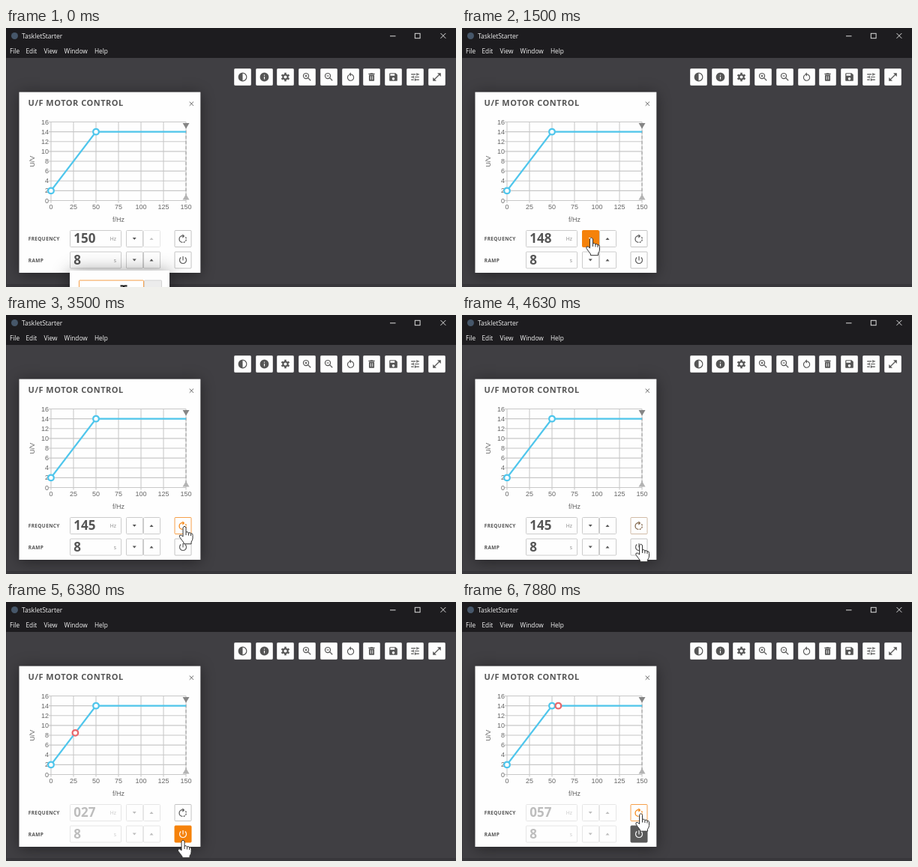
Write an HTML page with a canvas that moves like this. It is 600 px wide and 346 px high and loops after 8000 ms.

```html
<!DOCTYPE html>
<html lang="en">
<head>
<meta charset="utf-8">
<title>Motor control</title>
<style>
html, body { margin: 0; width: 100%; height: 100%; overflow: hidden; background: #403f43; }
canvas { display: block; width: 600px; height: 346px; }
</style>
</head>
<body>
<canvas id="stage" width="600" height="346"></canvas>
<script>
const ctx = document.getElementById('stage').getContext('2d');
const LOOP = 8000, TICK = 125, START = 5000;
const ORANGE = '#f5820b', AMBER = '#f6a04a', GREY = '#555555', BLUE = '#4fc6ec', RED = '#e8686c';
const SANS = '"Open Sans", "Noto Sans", sans-serif';
const PLOT = '"Liberation Sans", Arial, sans-serif';

// Icons on a 24 unit grid: s = stroked, f = filled (even-odd)
const disc = 'M12 2A10 10 0 0 1 12 22A10 10 0 0 1 12 2Z';
const lens = 'M15.5 9.5A6 6 0 1 1 3.5 9.5A6 6 0 1 1 15.5 9.5M14 14L20 20M7 9.5h5';
const ICONS = {
  contrast: { f: disc + 'M12 4A8 8 0 0 1 12 20Z' },
  info: { f: disc + 'M11 11h2v6h-2zM11 7h2v2h-2z' },
  gear: { f: gearPath() },
  zoomIn: { s: lens + 'M9.5 7v5' },
  zoomOut: { s: lens },
  replay: { s: 'M12 6A7 7 0 1 1 8 7.3', f: 'M12.5 1.5v9L8 6z' },
  trash: { f: 'M6 7h12v12q0 2-2 2H8q-2 0-2-2zM5 4h3.5l1-1h5l1 1H19v2H5zM9 10h1.5v8H9zM13.5 10H15v8h-1.5z' },
  save: { f: 'M5 3h12l4 4v12q0 2-2 2H5q-2 0-2-2V5q0-2 2-2zM5 5h10v4H5zM12 13a3 3 0 0 1 0 6a3 3 0 0 1 0-6z' },
  tune: { s: 'M3 6h10M15 6h6M16 3v6M3 12h5M11 12h10M8 9v6M3 18h6M12 18h9M12 15v6' },
  expand: { s: 'M6 18L18 6', f: 'M13 3h8v8zM3 13v8h8z' },
  turn: {
    s: 'M11 5A7 7 0 0 0 11 19M13 19A7 7 0 0 0 16.2 17.6M17.6 16.2A7 7 0 0 0 18.9 13M18.9 11A7 7 0 0 0 17.6 7.8',
    f: 'M11 1v9l4.5-4.5z'
  },
  power: { s: 'M12 3v10M7 5.8A8 8 0 1 0 17 5.8' }
};
const TOOLS = ['contrast', 'info', 'gear', 'zoomIn', 'zoomOut', 'replay', 'trash', 'save', 'tune', 'expand'];

const HAND = new Path2D('M-2 2Q0-1.6 2 2V8Q4.4 6.6 5.4 9Q8 7.6 8.5 10Q11 9 11 12.5V16Q11 18.5 9 21V23.7H-1V22Q-4 18-6.6 14.4Q-7.4 11.2-4.3 12L-2 14Z');
const KNUCKLES = new Path2D('M2 8v4M5.4 9v3.5M8.5 10v3');

// Pointer stops: time, x, y
const STOPS = [[0, 157, 351], [375, 157, 351], [1000, 172.5, 280], [2500, 172.5, 280],
  [3125, 238, 282], [4375, 238, 282.5], [4625, 238.5, 306], [4875, 236, 318],
  [6875, 236, 318], [7500, 238.5, 282.5]];

const clamp = (v, a = 0, b = 1) => Math.min(b, Math.max(a, v));
const ease = v => v * v * (3 - 2 * v);
const fade = (t, on, off) => clamp((t - on) / 200) * (1 - clamp((t - off) / 200));
const plotX = f => 60 + f * 1.2;
const plotY = u => 230.5 - u * 6.5625;

// Six teeth, five points each
function gearPath() {
  const teeth = [[-16, 7.2], [-13, 10], [13, 10], [16, 7.2], [30, 7]];
  let d = '';
  for (let i = 0; i < 30; i++) {
    const [turn, r] = teeth[i % 5];
    const a = (Math.floor(i / 5) * 60 + turn) * Math.PI / 180;
    d += (i ? 'L' : 'M') + (12 + r * Math.sin(a)) + ' ' + (12 - r * Math.cos(a));
  }
  return d + 'ZM12 8.5a3.5 3.5 0 0 1 0 7a3.5 3.5 0 0 1 0-7z';
}

function mix(a, b, k) {
  const part = (c, i) => parseInt(c.slice(i, i + 2), 16);
  return 'rgb(' + [1, 3, 5].map(i => Math.round(part(a, i) + (part(b, i) - part(a, i)) * k)) + ')';
}

function rect(x, y, w, h, fill) {
  ctx.fillStyle = fill;
  ctx.fillRect(x, y, w, h);
}

function box(x, y, w, h, fill, border) {
  ctx.beginPath();
  ctx.roundRect(x + .5, y + .5, w - 1, h - 1, 1);
  ctx.fillStyle = fill;
  ctx.fill();
  ctx.strokeStyle = border;
  ctx.lineWidth = 1;
  ctx.stroke();
}

function line(color, width, ...pts) {
  ctx.beginPath();
  pts.forEach(([x, y]) => ctx.lineTo(x, y));
  ctx.strokeStyle = color;
  ctx.lineWidth = width;
  ctx.stroke();
}

function text(str, x, y, size, color, { weight = 400, family = SANS, align = 'left', gap = 0 } = {}) {
  ctx.font = `${weight} ${size}px ${family}`;
  ctx.letterSpacing = gap + 'px';
  ctx.textAlign = align;
  ctx.fillStyle = color;
  ctx.fillText(str, x, y);
}

function triangle(x, y, w, h, color) {
  ctx.beginPath();
  ctx.moveTo(x - w / 2, y);
  ctx.lineTo(x + w / 2, y);
  ctx.lineTo(x, y + h);
  ctx.fillStyle = color;
  ctx.fill();
}

function icon(name, x, y, scale, color) {
  const { s, f } = ICONS[name];
  ctx.save();
  ctx.translate(x, y);
  ctx.scale(scale, scale);
  ctx.translate(-12, -12);
  ctx.fillStyle = ctx.strokeStyle = color;
  ctx.lineWidth = 2;
  if (s) ctx.stroke(new Path2D(s));
  if (f) ctx.fill(new Path2D(f), 'evenodd');
  ctx.restore();
}

function shadowed(x, y, w, h, blur) {
  ctx.save();
  ctx.shadowColor = 'rgba(0,0,0,.45)';
  ctx.shadowBlur = blur;
  ctx.shadowOffsetY = 2;
  rect(x, y, w, h, '#fefefe');
  ctx.restore();
}

function drawWindow() {
  rect(0, 0, 600, 346, '#403f43');
  rect(0, 0, 600, 40, '#1d1c1f');
  rect(0, 342, 600, 4, '#38373b');
  rect(0, 40, 1, 306, '#38373b');
  ctx.beginPath();
  ctx.arc(11.5, 10.5, 4.5, 0, 7);
  ctx.fillStyle = '#46576a';
  ctx.fill();
  text('TaskletStarter', 21, 13.6, 8.5, '#f0f0f0');
  [['File', 5], ['Edit', 26.5], ['View', 50.5], ['Window', 77.5], ['Help', 118]]
    .forEach(([s, x]) => text(s, x, 33.8, 8.3, '#f4f4f4'));
  line('#dcdcdc', 1, [512, 10.8], [519.5, 10.8]);
  ctx.strokeRect(545.3, 7.3, 6.8, 6.4);
  line('#dcdcdc', 1, [579.5, 7], [586.3, 13.8]);
  line('#dcdcdc', 1, [586.3, 7], [579.5, 13.8]);
  TOOLS.forEach((name, i) => {
    const x = Math.round(303.8 + i * 28.75);
    box(x, 54, 23, 23, '#fdfdfd', '#d8d8d8');
    icon(name, x + 11.5, 65.5, .59, GREY);
  });
}

function dot(f, u, color) {
  ctx.beginPath();
  ctx.arc(plotX(f), plotY(u), 3.8, 0, 7);
  ctx.fillStyle = '#fff';
  ctx.fill();
  ctx.strokeStyle = color;
  ctx.lineWidth = 2.3;
  ctx.stroke();
}

function drawChart(freq, running) {
  const label = { family: PLOT, align: 'center' };
  for (let f = 0; f <= 150; f += 25) {
    const x = plotX(f);
    line('#c8c8c8', 1.1, [x, 125.5], [x, 233.5]);
    text(f, x, 242, 9, '#666', label);
  }
  for (let u = 0; u <= 16; u += 2) {
    const y = plotY(u);
    line('#c8c8c8', 1.1, [57, y], [240, y]);
    text(u, 57, y + 3.1, 9, '#666', { ...label, align: 'right' });
  }
  text('f/Hz', 150, 258.5, 9, '#666', label);
  ctx.save();
  ctx.translate(38.2, 178.3);
  ctx.rotate(-Math.PI / 2);
  text('U/V', 0, 0, 9, '#666', label);
  ctx.restore();

  ctx.setLineDash([4, 3]);
  line('#9c9c9c', 1, [240, 130], [240, 228]);
  ctx.setLineDash([]);
  line(BLUE, 2.3, [60, plotY(2)], [120, plotY(14)], [240, plotY(14)]);
  triangle(240, 127, 9, 7.5, '#858585');
  triangle(240, 229.5, 9, -7.5, '#b3b3b3');
  dot(0, 2, BLUE);
  dot(50, 14, BLUE);
  if (running) dot(freq, Math.min(14, 2 + freq * .24), RED);
}

function drawRow(y, name, value, unit, off, atMax, press) {
  const ink = off ? '#bdbdbd' : GREY, edge = off ? '#e6e6e6' : '#cccccc';
  text(name, 29.8, y + 14, 6.5, GREY, { weight: 700, gap: .35 });
  box(85, y, 69, 23, '#fefefe', edge);
  text(value, 90.3, y + 17.4, 17, ink, { weight: 700 });
  text(unit, 147, y + 14, 6.8, off ? '#c8c8c8' : '#888', { align: 'right' });
  box(183, y, 23, 23, '#fefefe', off || atMax ? '#e6e6e6' : '#cccccc');
  box(160, y, 23, 23, mix('#fefefe', ORANGE, press), mix(edge, ORANGE, press));
  triangle(171.2, y + 10, 5, 3, mix(ink, '#ffffff', press));
  triangle(194, y + 13, 5, -3, atMax ? '#c4c4c4' : ink);
}

function drawPanel(t, freq, running) {
  shadowed(17.5, 85.6, 241.8, 241.4, 18);
  text('U/F MOTOR CONTROL', 29.6, 103.9, 11, GREY, { weight: 700, gap: .5 });
  line('#666', 1, [244.7, 98.5], [250, 103.8]);
  line('#666', 1, [250, 98.5], [244.7, 103.8]);
  drawChart(freq, running);
  const digits = String(freq).padStart(3, '0');
  drawRow(270, 'FREQUENCY', digits, 'Hz', running, freq === 150, fade(t, 850, 2475));
  drawRow(298.5, 'RAMP', '8', 's', running, false, 0);

  const turn = Math.max(fade(t, 2850, 4475), fade(t, 7175, 9000));
  box(224.5, 270, 23, 23, '#fefefe', mix('#c4c4c4', AMBER, turn));
  icon('turn', 236, 282, .62, mix(GREY, ORANGE, turn));

  const hover = fade(t, 4625, 7150);
  const fill = running ? mix('#5a5a5a', ORANGE, hover) : '#fefefe';
  box(224.5, 298.5, 23, 23, fill, running ? fill : mix('#c4c4c4', AMBER, hover));
  icon('power', 236, 310, .56, running ? '#fff' : mix(GREY, ORANGE, hover));
}

function drawPopup(alpha) {
  if (alpha <= 0) return;
  ctx.save();
  ctx.globalAlpha = alpha;
  shadowed(85, 324, 133, 40, 24);
  box(184, 336.6, 24, 24, '#ececec', '#d4d4d4');
  box(97, 336.6, 87, 24, '#fefefe', AMBER);
  ctx.restore();
}

function pointerAt(t) {
  const i = STOPS.findIndex(s => s[0] > t);
  if (i < 0) return STOPS[STOPS.length - 1].slice(1);
  const [t0, x0, y0] = STOPS[i - 1], [t1, x1, y1] = STOPS[i];
  const k = ease((t - t0) / (t1 - t0));
  return [x0 + (x1 - x0) * k, y0 + (y1 - y0) * k];
}

function drawPointer(t) {
  const [x, y] = pointerAt(t);
  ctx.save();
  ctx.translate(x, y);
  if (t < 500) {
    line('#111', 2, [-4.5, -6.5], [-1, -6.5], [0, -5.5], [1, -6.5], [4.5, -6.5]);
    line('#111', 2.4, [0, -5], [0, 6]);
  } else {
    ctx.fillStyle = '#fff';
    ctx.fill(HAND);
    ctx.strokeStyle = '#333';
    ctx.lineWidth = 1;
    ctx.stroke(HAND);
    ctx.stroke(KNUCKLES);
  }
  ctx.restore();
}

function draw(now) {
  const t = Math.floor(now % LOOP / TICK) * TICK;
  const running = t >= START;
  const freq = running
    ? Math.floor((t - START) / 50)
    : 150 - clamp(Math.floor((t - 870) / 285), 0, 5);
  drawWindow();
  drawPanel(t, freq, running);
  drawPopup(1 - clamp((t - 250) / 250));
  drawPointer(t);
}

const begin = performance.now();
(function loop() {
  draw(performance.now() - begin);
  requestAnimationFrame(loop);
})();
</script>
</body>
</html>
```
